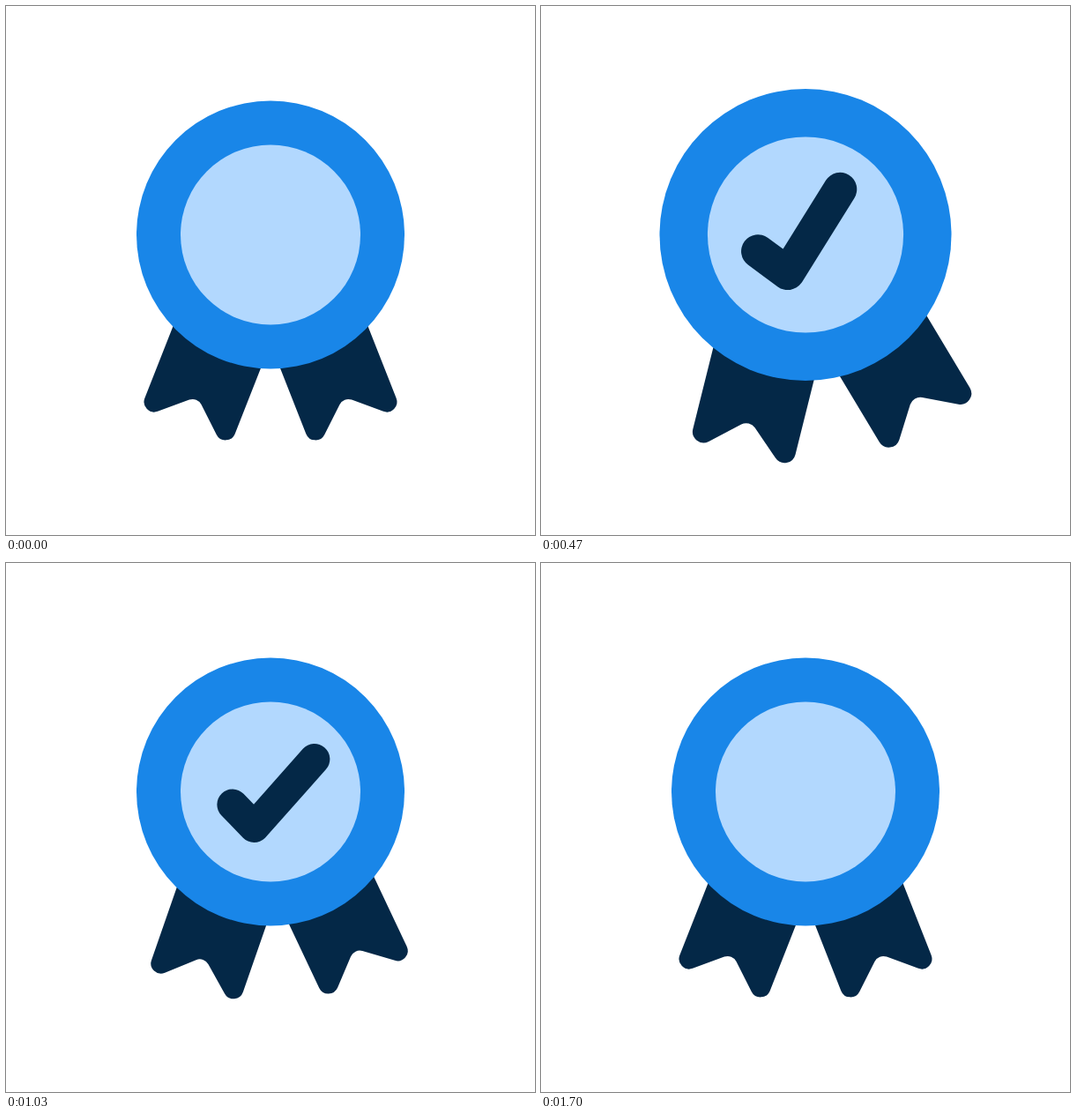
Write an HTML page that moves like this. It is 600 px wide and 600 px high and loops after 2.01 s.

```html
<!DOCTYPE html>
<html lang="en">
<head>
<meta charset="utf-8">
<title>Award badge</title>
<style>
  html, body { margin: 0; width: 100%; height: 100%; overflow: hidden; background: #fff; }
  svg { display: block; width: 100vw; height: 100vh; }
</style>
</head>
<body>
<svg viewBox="0 0 600 600">
  <defs>
    <path id="ribbon" fill="#042847" d="M55 50V224.7A11.5 11.5 0 0 1 35.9 233.3L7.3 207.8A11 11 0 0 0 -7.3 207.8L-35.9 233.3A11.5 11.5 0 0 1 -55 224.7V50Z"/>
  </defs>
  <g id="badge">
    <g transform="scale(-1 1)"><use id="left" href="#ribbon"/></g>
    <use id="right" href="#ribbon"/>
    <circle r="152" fill="#1986e8"/>
    <circle r="102" fill="#b2d8fe"/>
    <path id="tick" d="M-26.7 -27.7L0 0L68.5 -76.9" fill="none" stroke="#042847" stroke-width="35" stroke-linecap="round" stroke-linejoin="round"/>
  </g>
</svg>
<script>
const LOOP = 2010, FRAME = 100 / 3;
const LEFT_DELAY = 133, REST_ANGLE = 21.5, TICK_LENGTH = 141.5;

// Each track is a list of [ms, value], eased in and out between entries.
const badgeScale = [[0, 1], [210, .9], [425, 1.1], [625, 1]];
const ribbonSwing = [[0, 0], [263, -12], [518, 12], [785, -6.4], [1055, 4], [1310, -2], [1445, 1], [1567, 0]];
const tickTilt = [[0, 0], [225, -8.5], [485, 10], [860, -2], [1100, .6], [1400, 0]];
const tickEnd = [[0, 0], [382, 1]];
const tickStart = [[1000, 0], [1382, 1]];

const [badge, left, right, tick] =
  ['badge', 'left', 'right', 'tick'].map(id => document.getElementById(id));

function at(track, t) {
  const i = track.findIndex(key => key[0] > t);
  if (i === 0) return track[0][1];
  if (i < 0) return track[track.length - 1][1];
  const [t0, a] = track[i - 1], [t1, b] = track[i];
  const u = (t - t0) / (t1 - t0);
  return a + (b - a) * u * u * (3 - 2 * u);
}

function swing(ribbon, t) {
  const angle = REST_ANGLE + at(ribbonSwing, t);
  ribbon.setAttribute('transform', `rotate(${-angle}) translate(9.8 0)`);
}

function draw(t) {
  badge.setAttribute('transform', `translate(300 259.5) scale(${at(badgeScale, t)})`);
  swing(right, t);
  swing(left, t - LEFT_DELAY);

  const from = at(tickStart, t) * TICK_LENGTH;
  const length = at(tickEnd, t) * TICK_LENGTH - from;
  tick.setAttribute('visibility', length > .01 ? 'visible' : 'hidden');
  tick.setAttribute('stroke-dasharray', `${Math.max(length, .01)} 400`);
  tick.setAttribute('stroke-dashoffset', -from);
  tick.setAttribute('transform', `translate(-18.5 40) rotate(${-at(tickTilt, t)})`);
}

const origin = performance.now();
function loop() {
  const t = (performance.now() - origin) % LOOP;
  draw(Math.floor((t + 5) / FRAME) * FRAME); // stepped at 30 fps
  requestAnimationFrame(loop);
}
loop();
</script>
</body>
</html>
```
